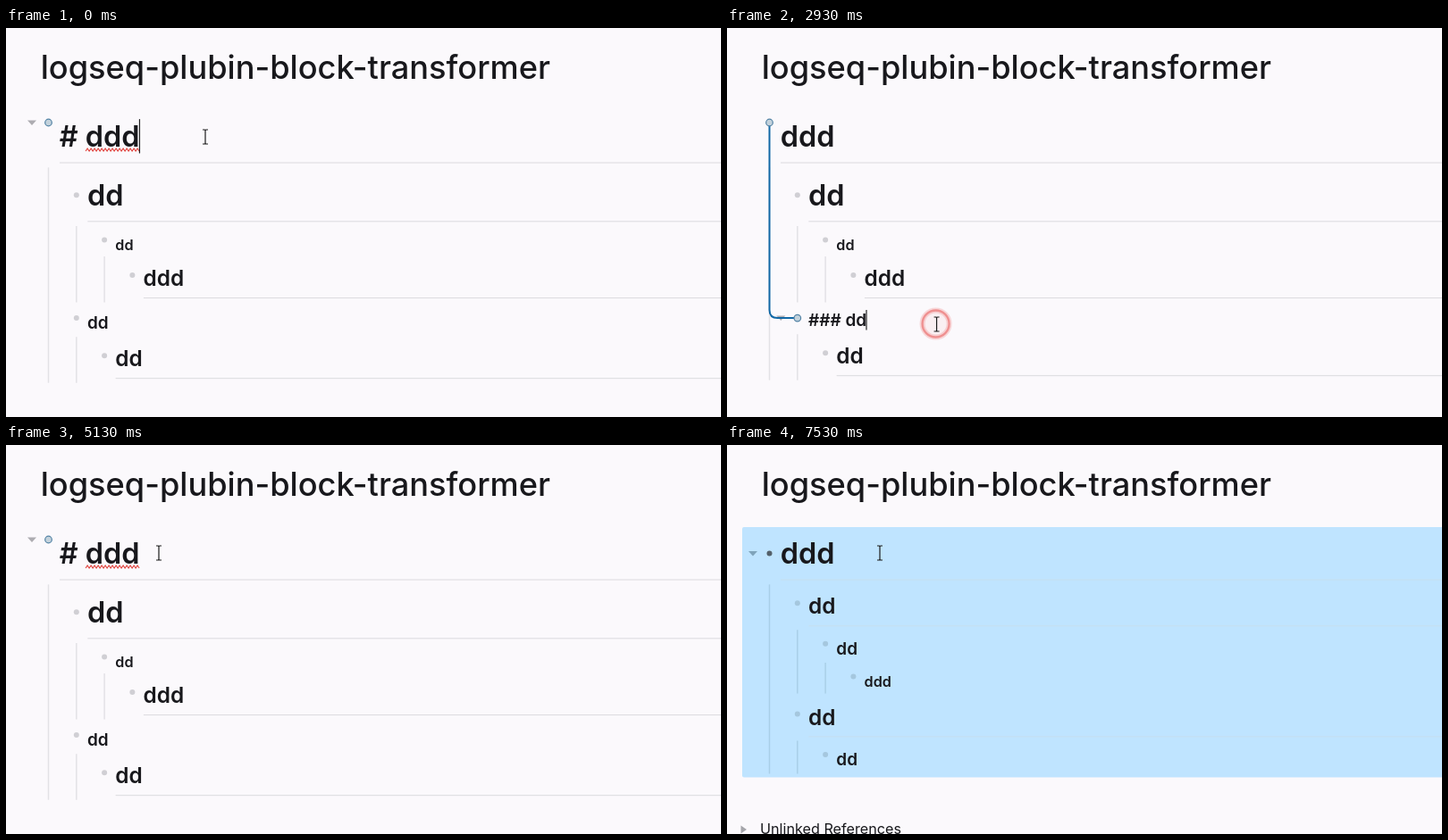
An HTML page that plays this animation: 800 px wide and 436 px high, repeating every 8 s.

```html
<!DOCTYPE html>
<html lang="en">
<head>
<meta charset="utf-8">
<title>Block outline</title>
<style>
html, body { margin: 0; width: 100%; height: 100%; overflow: hidden; background: #fbf9fc; }
svg { display: block; width: 800px; height: 436px; }
text { font-family: Inter, sans-serif; font-optical-sizing: none; fill: #18181c; white-space: pre; }
</style>
</head>
<body>
<svg id="stage" viewBox="0 0 800 436" xmlns="http://www.w3.org/2000/svg"></svg>
<script>
const LOOP = 8000, BLINK = 520;
const SELECT_AT = 6530;
const stage = document.getElementById('stage');

function add(tag, attrs = {}, parent = stage) {
  const el = document.createElementNS('http://www.w3.org/2000/svg', tag);
  return set(parent.appendChild(el), attrs);
}
function set(el, attrs) {
  for (const k in attrs) el.setAttribute(k, attrs[k]);
  return el;
}
function show(el, on) { el.style.display = on ? '' : 'none'; }

// Per heading level: font size, baseline, row height, bullet drop, rule, edit shrink and baseline shift.
const LEVEL = {
  1: { size: 32.5, base: 27, height: 65.8, drop: 15.5, rule: 45, shrink: 0, lift: 0 },
  2: { size: 24.4, base: 17.6, height: 51, drop: 5.5, rule: 31, shrink: 0, lift: 0 },
  3: { size: 19, base: 12.3, height: 36.6, drop: 0, shrink: 3, lift: 3.3 },
  4: { size: 16.2, base: 11.7, height: 34, drop: 0, shrink: 4, lift: 5.8 }
};

// Each block: text, depth, parent, last descendant, heading before and after, time it is converted.
const rows = [
  { text: 'ddd', depth: 0, parent: -1, last: 5, from: 1, to: 1, at: 0 },
  { text: 'dd', depth: 1, parent: 0, last: 3, from: 1, to: 2, at: 6600 },
  { text: 'dd', depth: 2, parent: 1, last: 3, from: 4, to: 3, at: 6600 },
  { text: 'ddd', depth: 3, parent: 2, last: 3, from: 2, to: 4, at: 6670 },
  { text: 'dd', depth: 1, parent: 0, last: 5, from: 3, to: 2, at: 6730 },
  { text: 'dd', depth: 2, parent: 4, last: 5, from: 2, to: 3, at: 6800 }
];

// Which block is edited from when; blink is the start of the caret cycle.
const edits = [
  { at: 0, row: 0, blink: -450 },
  { at: 930, row: 1 },
  { at: 1720, row: 2 },
  { at: 2800, row: 4 },
  { at: 3540, row: 5 },
  { at: 4600, row: 0 },
  { at: SELECT_AT, row: -1 }
];
const clicks = [930, 1690, 2800, 3540, 4530];

const path = [
  [0, 223, 122], [470, 223, 122], [730, 190, 180], [1200, 190, 180],
  [1600, 233, 242], [1950, 233, 242], [2300, 278, 283], [2460, 262, 350],
  [2600, 234, 332], [3200, 235, 332], [3470, 246, 376], [3850, 246, 376],
  [4150, 176, 100], [4270, 171, 121], [LOOP, 171, 121]
];

function pointerAt(t) {
  let i = 0;
  while (i < path.length - 2 && t >= path[i + 1][0]) i++;
  const [t0, x0, y0] = path[i], [t1, x1, y1] = path[i + 1];
  const p = (t - t0) / (t1 - t0), e = p * p * (3 - 2 * p);
  return { x: x0 + (x1 - x0) * e, y: y0 + (y1 - y0) * e };
}

const bulletX = d => 47.5 + 31.3 * d;
const textX = d => 60 + 31.3 * d;

// Static parts and layers
const panel = add('rect', { x: 17, y: 92, width: 790, rx: 2 });
add('text', { x: 38.7, y: 56.5, 'font-size': 36.2, 'font-weight': 500 })
  .textContent = 'logseq-plubin-block-transformer';

for (const r of rows) {
  r.guide = add('line', { 'stroke-width': 1.5 });
  r.rule = add('line', { 'stroke-width': 1 });
}
const arrow = add('path', { d: 'M-5-2.5H5L0 3Z' });
const thread = add('path', { fill: 'none', stroke: '#1168a6', 'stroke-width': 2 });
for (const r of rows) {
  r.bullet = add('circle');
  r.label = add('text', { x: textX(r.depth) - .3, 'font-weight': 600 });
}
const squiggle = add('path', { fill: 'none', stroke: '#e0413c', 'stroke-width': 1.1 });
const caret = add('line', { stroke: '#222', 'stroke-width': 1.2 });

const refs = add('g');
add('path', { d: 'M15.5-9.5L22-5L15.5-.5Z', fill: '#a5a5aa' }, refs);
add('text', { x: 37, y: 0, 'font-size': 16.2 }, refs).textContent = 'Unlinked References';

const ring = add('g', { fill: 'none', stroke: '#ee8585' });
const glow = add('circle', { 'stroke-width': 6, 'stroke-opacity': .3, fill: '#f6a0a0', 'fill-opacity': .1 }, ring);
const rim = add('circle', { 'stroke-width': 2.4, 'stroke-opacity': .85 }, ring);

const beam = add('path', {
  d: 'M-3-8H-1Q0-8 0-7Q0-8 1-8H3M0-7V7M-3 8H-1Q0 8 0 7Q0 8 1 8H3',
  fill: 'none', stroke: '#1c1c1c', 'stroke-width': 1.2
});
const hand = add('path', {
  d: 'M-2 1Q-2-1 0-1Q2-1 2 1V8Q2 6.5 3.5 6.5Q5 6.5 5 8V9Q5 7.5 6.5 7.5Q8 7.5 8 9V10Q8 8.5 9.3 8.5Q10.5 8.5 10.5 10V15Q10.5 18 8.5 20V22.5H0V20L-5.5 13Q-6.5 11 -5 10.5Q-4 10 -2 12.5ZM2 8V12M5 9V12M8 10V12',
  fill: '#fff', stroke: '#222', 'stroke-width': 1.1, 'stroke-linejoin': 'round'
});

const keys = add('g');
add('rect', { x: 7, y: 394, width: 96, height: 35, rx: 4, fill: '#85858a', 'fill-opacity': .55 }, keys);
add('text', {
  x: 11, y: 420, 'font-size': 26, 'paint-order': 'stroke', stroke: '#77777b',
  'stroke-width': 3, 'stroke-linejoin': 'round',
  style: 'font-family:"DejaVu Sans",sans-serif;fill:#fff'
}, keys).textContent = 'Ctrl+T';

function layout(t, editing) {
  let y = 106;
  rows.forEach((r, i) => {
    r.level = t >= r.at ? r.to : r.from;
    const f = LEVEL[r.level], on = i === editing;
    r.y = y;
    r.base = y + f.base - (on ? f.lift : 0);
    r.end = y + f.height - (on ? f.shrink : 0);
    y = r.end;
    const next = rows[i + 1];
    if (next && next.depth < r.depth) y += 2.5;
  });
}

function drawThread(row) {
  const chain = [];
  for (let i = row; i >= 0; i = rows[i].parent) chain.unshift(rows[i]);
  let d = '';
  chain.forEach((r, i) => {
    const x = bulletX(r.depth);
    d += i ? `V${r.y - 9}q0 9 9 9H${x}` : `M${x} ${r.y}`;
  });
  set(thread, { d });
  show(thread, chain.length > 1);
  return chain;
}

function drawRows(editing, selected) {
  const chain = drawThread(editing);
  rows.forEach((r, i) => {
    const f = LEVEL[r.level], on = i === editing, active = chain.includes(r);
    const x = bulletX(r.depth);
    r.label.textContent = on ? '#'.repeat(r.level) + ' ' + r.text : r.text;
    set(r.label, { y: r.base, 'font-size': f.size });

    const root = selected && i === 0;
    r.mark = r.y + (active ? 0 : f.drop);
    set(r.bullet, {
      cx: x, cy: r.mark, r: active ? 3.8 : 3,
      fill: active ? '#c3d2dc' : root ? '#54606a' : selected ? '#a5c7de' : '#d0cfd4',
      stroke: active ? '#5383a5' : 'none', 'stroke-width': 1.2
    });

    show(r.rule, f.rule);
    if (f.rule) set(r.rule, {
      x1: textX(r.depth), x2: 800, y1: r.y + f.rule, y2: r.y + f.rule,
      stroke: selected ? '#c6dfee' : '#dbdade'
    });
    show(r.guide, r.last > i);
    if (r.last > i) set(r.guide, {
      x1: x, x2: x, y1: rows[i + 1].y - 15.5, y2: rows[r.last].end - 15,
      stroke: selected ? '#a9cfe8' : '#e3e2e6'
    });
  });
}

function drawCaret(t, edit) {
  const r = rows[edit.row];
  const start = edit.blink === undefined ? edit.at : edit.blink;
  const on = r && Math.floor((t - start) / BLINK) % 2 === 0;
  show(caret, on);
  show(squiggle, edit.row === 0);
  if (!r) return;
  const size = LEVEL[r.level].size, left = textX(r.depth);
  const x = left + r.label.getComputedTextLength() - .5;
  set(caret, { x1: x, x2: x, y1: r.base - size * .95, y2: r.base + size * .23 });
  if (edit.row === 0) {
    let px = left + r.label.getSubStringLength(0, 2), d = `M${px} 138`;
    for (let up = true; px < x - 2; up = !up) d += `L${px += 2} ${up ? 135 : 138}`;
    set(squiggle, { d });
  }
}

function drawArrow(p, selected) {
  const hover = selected ? 0 : rows.findIndex(r => p.y < r.end - 15);
  const r = rows[hover], on = r && r.last > hover;
  show(arrow, on);
  if (on) set(arrow, {
    transform: `translate(${bulletX(r.depth) - 18.5} ${r.mark})`,
    fill: selected ? '#7fa3ba' : '#adacb1'
  });
}

function drawPointer(t, p) {
  const pointing = t >= SELECT_AT && t < 6670;
  show(hand, pointing);
  show(beam, !pointing);
  set(pointing ? hand : beam, { transform: `translate(${p.x} ${p.y})` });

  const start = clicks.find(c => t >= c && t < c + 400);
  show(ring, start !== undefined);
  if (start === undefined) return;
  const age = (t - start) / 400, at = { cx: p.x - 1, cy: p.y - .5 };
  const radius = 11 + 7 * Math.sqrt(age);
  set(glow, { ...at, r: radius });
  set(rim, { ...at, r: radius });
  set(ring, { opacity: Math.min(1, (1 - age) * 2) });
}

function draw(t) {
  const edit = edits.filter(e => t >= e.at).pop();
  const selected = t >= SELECT_AT, p = pointerAt(t);
  layout(t, edit.row);
  drawRows(edit.row, selected);
  drawCaret(t, edit);
  drawArrow(p, selected);
  drawPointer(t, p);

  const bottom = rows[5].end - 11;
  show(panel, selected);
  set(panel, { height: bottom - 92, fill: t < 6800 ? '#c2e6ff' : '#bfe4ff' });
  set(refs, { transform: `translate(0 ${bottom + 63.5})` });
  show(keys, t >= 5730 && t < 7530);
}

function tick() {
  draw(performance.now() % LOOP);
  requestAnimationFrame(tick);
}
tick();
</script>
</body>
</html>
```
